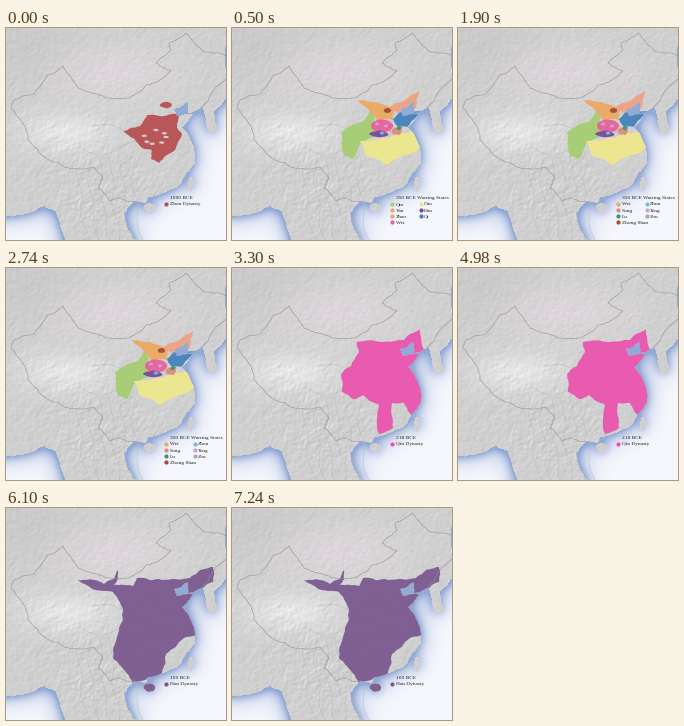
Write a matplotlib script that moves like this. It is 220 px wide and 212 px high and loops after 8 s.

```python
import numpy as np
import matplotlib.pyplot as plt
from matplotlib.animation import FuncAnimation
from matplotlib.patches import PathPatch
from matplotlib.path import Path

W, H, DPI = 220, 212, 100
INTERVAL, FRAMES = 100, 80
STARTS = [0, 500, 1900, 3300, 6100]  # ms at which each scene begins

rng = np.random.default_rng(8)


def roughen(key_points, closed=True, rounds=3, amount=0.09):
    """Join a few key points with a natural, map-like line."""
    pts = np.array([p.split(",") for p in key_points.split()], float)
    for _ in range(rounds):
        ends = np.roll(pts, -1, axis=0) if closed else pts[1:]
        begins = pts if closed else pts[:-1]
        step = ends - begins
        normal = np.column_stack([-step[:, 1], step[:, 0]])
        mids = (begins + ends) / 2 + normal * rng.uniform(-amount, amount, (len(step), 1))
        joined = np.empty((len(begins) * 2, 2))
        joined[0::2], joined[1::2] = begins, mids
        pts = joined if closed else np.vstack([joined, pts[-1]])
    return pts


def close(pts):
    return Path(np.vstack([pts, pts[0]]), closed=True)


def outline(key_points):
    return close(roughen(key_points))


def blob(cx, cy, rx, ry, rough=0.1):
    """A lumpy ellipse."""
    angle = np.linspace(0, 2 * np.pi, 36, endpoint=False)
    radius = 1 + sum(rng.normal(0, rough / k ** 0.5) * np.sin(k * angle + rng.uniform(0, 6))
                     for k in range(2, 8))
    return close(np.column_stack([cx + rx * radius * np.cos(angle),
                                  cy + ry * radius * np.sin(angle)]))


def blur(field, sigma):
    fy = np.fft.fftfreq(field.shape[0])[:, None]
    fx = np.fft.fftfreq(field.shape[1])[None, :]
    kernel = np.exp(-2 * (np.pi * sigma) ** 2 * (fx ** 2 + fy ** 2))
    return np.fft.ifft2(np.fft.fft2(field) * kernel).real


def bump(cx, cy, rx, ry):
    return np.exp(-((gx - cx) / rx) ** 2 - ((gy - cy) / ry) ** 2)


# Coastline
mainland = outline(
    "-5,-5 225,-5 225,64 208,83 212,104 203,106 197,80 182,85 182,74 168,81 "
    "171,88 187,86 176,99 188,119 189,135 174,157 158,165 142,169 140,175 "
    "128,173 118,185 131,217 61,217 50,183 38,178 -5,188")
islands = [blob(185, 156, 3, 7, 0.05), blob(143.5, 179.5, 5.5, 4.5, 0.05)]
land = Path.make_compound_path(mainland, *islands)

gy, gx = np.mgrid[0:H, 0:W] + 0.5
cells = np.column_stack([gx.ravel(), gy.ravel()])
mask = np.any([p.contains_points(cells) for p in (mainland, *islands)], axis=0).reshape(H, W)

# Sea: greyish blue along the coast, fading to near white
margin = 45
padded = np.pad(mask.astype(float), margin, mode="edge")
glow = (blur(padded, 5) + blur(padded, 12))[margin:-margin, margin:-margin]
glow = np.clip(glow * 1.05, 0, 1)[..., None]
sea = np.array([247, 248, 253]) * (1 - glow) + np.array([148, 170, 214]) * glow

# Land: grey relief with a white plateau and a pinkish northern steppe
height = blur(rng.normal(size=(H, W)), 1) * 3 + blur(rng.normal(size=(H, W)), 3) * 8
slope = np.gradient(height, axis=1) + np.gradient(height, axis=0)
plateau = bump(60, 104, 44, 20)
steppe = bump(105, 45, 65, 28)
rough = 0.5 + 0.6 * bump(95, 165, 60, 40) + 0.4 * plateau
grey = 208 + slope * rough * 7 + 22 * plateau + 9 * steppe - 6 * bump(20, 20, 60, 40)
ground = grey[..., None] + steppe[..., None] * np.array([4, -2, 2])
terrain = np.where(mask[..., None], ground, sea).clip(0, 255).astype(np.uint8)

fig = plt.figure(figsize=(W / DPI, H / DPI), dpi=DPI)
ax = fig.add_axes([0, 0, 1, 1])
ax.imshow(terrain, extent=(0, W, H, 0), interpolation="nearest", aspect="auto")
ax.set(xlim=(0, W), ylim=(H, 0))
ax.axis("off")

# Frontier
for key_points in (
        "128,173 112,170 104,173 92,160 97,150 88,139 65,141 40,130 22,112 5,80 8,72 "
        "28,66 42,47 57,38 72,60 100,70 126,68 140,57 165,43 150,35 165,22 163,15 "
        "180,5 198,24 221,28",
        "221,50 207,63 195,80"):
    ax.plot(*roughen(key_points, closed=False).T, color="#949494", lw=0.4, zorder=4)

# Rivers: two running east, and a fan running south
t = np.linspace(0, 1, 60)
rivers = [(75 + 110 * t, 120 + 7 * np.sin(9 * t)),
          (85 + 80 * t, 98 - 10 * np.sin(11 * t) * t)]
for x in range(72, 130, 11):
    rivers.append((x + 10 * t ** 2 + 2 * np.sin(12 * t + x), 130 + 85 * t))
for x, y in rivers:
    ax.plot(x, y, color="#b4b7bb", lw=0.3, zorder=2)


def region(color, *paths):
    """Coloured territory; whatever spills into the sea is clipped away."""
    patches = []
    for path in paths:
        patch = ax.add_patch(PathPatch(path, fc=color, ec="none", alpha=0.94, zorder=3))
        patch.set_clip_path(land, ax.transData)
        patches.append(patch)
    return patches


def label(x, y, text):
    return ax.text(x, y, text, family="Liberation Serif", size=5.4 * 72 / DPI,
                   color="#222222", zorder=6)


def legend(title, *columns):
    """Each column lists (name, color) pairs."""
    items = [label(163.5, 171.2, title)]
    for column, rows in enumerate(columns):
        x = 160 + 28.5 * column
        for row, (name, color) in enumerate(rows):
            y = 175.6 + 6.2 * row
            items += ax.plot(x, y, "o", ms=4.2 * 72 / DPI, color=color, mew=0, zorder=6)
            items.append(label(x + 3.6, y + 1.8, name))
    return items


RED, PINK, PURPLE = "#b84f51", "#ea54ae", "#7b588f"
GREEN, YELLOW, ORANGE, SALMON = "#a5cd72", "#eee88c", "#eca862", "#eea284"
ROSE, BLUE, VIOLET, BROWN = "#e8609c", "#4282bd", "#75499b", "#a3493d"
TEAL, SKY, LILAC, TAN = "#439276", "#7bb9dc", "#c9a4d2", "#dd8d77"

zhou = region(
    RED,
    outline("117,103 134,98 141,87 158,88 174,86 171,99 176,106 169,122 153,135 "
            "145,131 146,122 136,120"),
    blob(160, 77, 6, 3))
zhou += region("#dcd8d8", *(blob(149 + 11 * np.cos(2.4 * k), 109 + 7 * np.sin(2.4 * k), 2.6, 1.2)
                            for k in range(7)))

states = (
    region(GREEN, outline("109,104 132,93 141,80 143,108 129,115 121,131 112,127"))
    + region(YELLOW, outline("128,113 158,109 181,103 192,114 184,124 155,137 133,127"))
    + region(ORANGE, outline("125,72 150,76 163,79 161,92 145,92 138,83"))
    + region(SALMON, outline("158,79 172,73 188,63 184,80 167,86"))
    + region(TAN, blob(165, 103, 5, 4))
    + region(ROSE, blob(150, 98, 11, 6.5, 0.06))
    + region(VIOLET, blob(147, 106, 9, 3.2))
    + region(BLUE, outline("161,91 169,84 189,83 175,99 165,98"))
    + region(BROWN, blob(155.5, 82.5, 3.5, 2.5))
    + region(TEAL, blob(167, 100, 2.5, 2))
    + region(SKY, blob(150, 105, 2.5, 1.5))
    + region(LILAC, blob(145, 96, 2, 1.5), blob(154, 98, 2, 1.5)))

qin = region(PINK, outline(
    "109,106 119,98 127,84 125,74 150,74 172,72 188,61 192,82 195,120 192,142 182,150 "
    "172,135 160,135 161,160 147,166 147,137 131,127 121,131 110,124"))

han = region(
    PURPLE,
    outline("72,72 84,71 98,76 108,71 112,62 112,71 108,77 127,78 131,70 156,72 184,70 "
            "194,62 207,59 207,74 194,82 194,124 178,130 160,146 156,165 142,170 128,178 "
            "115,158 107,150 113,123 117,102 107,84 85,80"),
    islands[1])

warring = "350 BCE Warring States"
scenes = [
    zhou + legend("1000 BCE", [("Zhou Dynasty", RED)]),
    states + legend(warring,
                    [("Qin", GREEN), ("Yan", SALMON), ("Zhao", ORANGE), ("Wei", ROSE)],
                    [("Chu", YELLOW), ("Han", VIOLET), ("Qi", BLUE)]),
    states + legend(warring,
                    [("Wei", ORANGE), ("Song", TAN), ("Lu", TEAL), ("Zhong Shan", BROWN)],
                    [("Zhou", SKY), ("Teng", LILAC), ("Zou", "#a8adb5")]),
    qin + legend("218 BCE", [("Qin Dynasty", PINK)]),
    han + legend("100 BCE", [("Han Dynasty", PURPLE)]),
]
artists = list(dict.fromkeys(artist for scene in scenes for artist in scene))


def draw(frame):
    current = np.searchsorted(STARTS, frame * INTERVAL, side="right") - 1
    shown = set(scenes[current])
    for artist in artists:
        artist.set_visible(artist in shown)
    return artists


anim = FuncAnimation(fig, draw, frames=FRAMES, interval=INTERVAL, repeat=True, repeat_delay=0)
plt.show()
```
